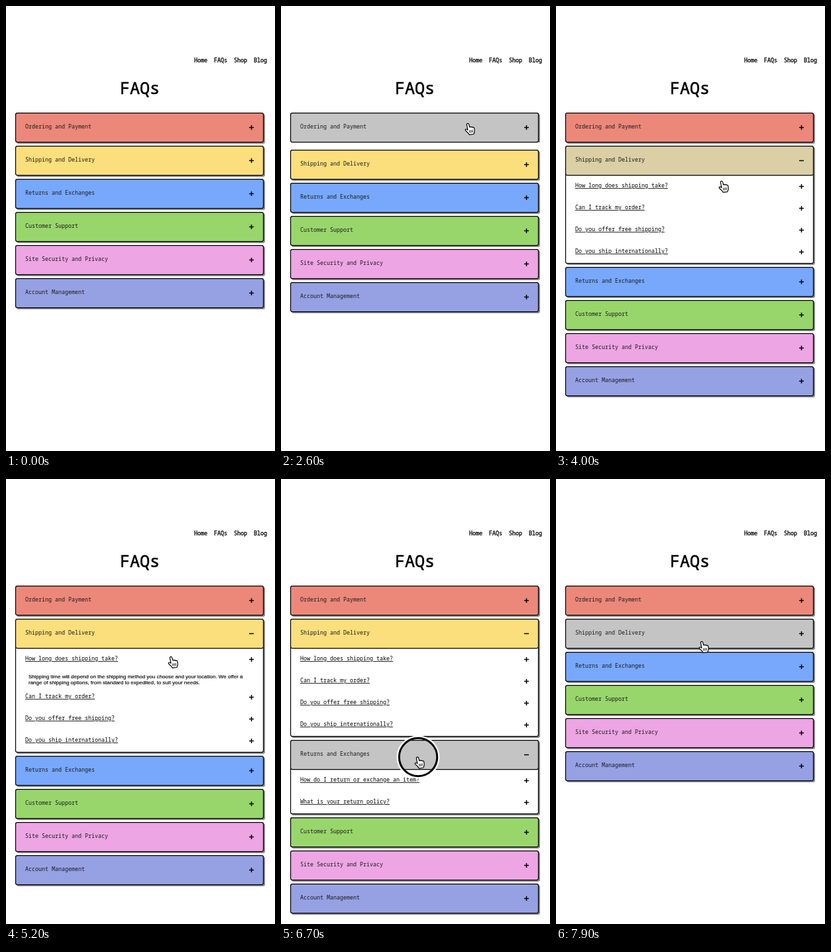
An HTML page for the animation above (8 s loop, 406 by 672 pixels).

```html
<!DOCTYPE html>
<html lang="en">
<head>
<meta charset="utf-8">
<title>FAQs</title>
<style>
  html, body { margin: 0; width: 100%; height: 100%; overflow: hidden; background: #fff; }
  svg { display: block; width: 406px; height: 672px; }
  text { font: 8.333px "Noto Sans Mono", "DejaVu Sans Mono", monospace; fill: #000; }
  .nav { stroke: #000; stroke-width: 0.3; }
  .title { font-size: 25px; stroke: #000; stroke-width: 0.6; }
  .label { fill: #1a1a1a; }
  .question { text-decoration: underline; }
  .answer { font: 8px "Liberation Sans", Arial, sans-serif; stroke: #000; stroke-width: 0.15; }
  .sign { fill: none; stroke: #000; stroke-width: 1.5; }
  .box { stroke: #000; stroke-width: 1.25; }
  .shadow { fill: #8c8c8c; }
</style>
</head>
<body>
<svg id="stage" viewBox="0 0 406 672"></svg>
<script>
const LOOP = 8000, ROW = 33, ANSWER_HEIGHT = 28;
const HOVER_GREY = [196, 196, 196];

// open and hover hold [start, end] times in ms
const sections = [
  { label: 'Ordering and Payment', color: [236, 136, 122], open: [[1307, 2455]], hover: [[620, 2780]],
    questions: ['How do I place an order?', 'What payment methods do you accept?',
      'How do I change or update my order?', 'Is my payment information secure?'] },
  { label: 'Shipping and Delivery', color: [251, 223, 124], open: [[3380, 7590]],
    hover: [[2880, 3900], [7250, 9000]],
    questions: ['How long does shipping take?', 'Can I track my order?',
      'Do you offer free shipping?', 'Do you ship internationally?'],
    answer: ['Shipping time will depend on the shipping method you choose and your location. We offer a',
      'range of shipping options, from standard to expedited, to suit your needs.'] },
  { label: 'Returns and Exchanges', color: [120, 168, 252], open: [[6150, 6760]], hover: [[5880, 7080]],
    questions: ['How do I return or exchange an item?', 'What is your return policy?'] },
  { label: 'Customer Support', color: [152, 214, 108] },
  { label: 'Site Security and Privacy', color: [237, 165, 228] },
  { label: 'Account Management', color: [150, 161, 228] }
];
const answerOpen = [[4385, 5176]];
const clicks = [...sections.flatMap(section => section.open || []), ...answerOpen].flat();

// Pointer tip: [time, x, y]
const pointer = [
  [100, 400, 418], [800, 282, 178], [2700, 282, 178], [3050, 255, 238], [3780, 255, 238],
  [3980, 250, 265], [4300, 249, 269], [5500, 249, 269], [6000, 206, 420.5],
  [6980, 206, 420.5], [7350, 220, 246], [8000, 220, 246]
];

// The CSS "ease" timing curve
function ease(x) {
  if (x <= 0) return 0;
  if (x >= 1) return 1;
  let low = 0, high = 1, u = 0.5;
  for (let i = 0; i < 20; i++) {
    u = (low + high) / 2;
    const at = 0.75 * u * (1 - u) + u ** 3;
    if (at < x) low = u; else high = u;
  }
  return 0.3 * u * (1 - u) ** 2 + 3 * u * u * (1 - u) + u ** 3;
}

const active = (spans, t) => spans.some(([a, b]) => t >= a && t < b);

function level(spans, t, duration) {
  return spans.reduce((sum, [a, b]) => sum + ease((t - a) / duration) - ease((t - b) / duration), 0);
}

function pointerAt(t) {
  const next = Math.max(1, pointer.findIndex(p => p[0] >= t));
  const [t0, x0, y0] = pointer[next - 1], [t1, x1, y1] = pointer[next];
  const k = Math.min(1, Math.max(0, (t - t0) / (t1 - t0)));
  const s = k * k * (3 - 2 * k);
  return [x0 + (x1 - x0) * s, y0 + (y1 - y0) * s];
}

const stage = document.getElementById('stage');

function add(parent, tag, attrs = {}, content) {
  const node = document.createElementNS('http://www.w3.org/2000/svg', tag);
  set(node, attrs);
  if (content) node.textContent = content;
  parent.appendChild(node);
  return node;
}

function set(node, attrs) {
  for (const name in attrs) node.setAttribute(name, attrs[name]);
}

const show = (node, visible) => node.setAttribute('visibility', visible ? 'visible' : 'hidden');
const moveTo = (node, x, y) => node.setAttribute('transform', `translate(${x} ${y})`);
const signPath = (y, minus) => `M367 ${y}h7` + (minus ? '' : `M370.5 ${y - 3.5}v7`);

function addClip(id, y) {
  const clip = add(stage, 'clipPath', { id });
  return add(clip, 'rect', { x: 14, y, width: 380, height: 0 });
}

['Home', 'FAQs', 'Shop', 'Blog'].forEach((name, i) =>
  add(stage, 'text', { class: 'nav', x: 284 + 30 * i, y: 85 }, name));
add(stage, 'text', { class: 'title', x: 172, y: 133 }, 'FAQs');

function buildSection(section, index) {
  const group = add(stage, 'g');
  const part = { section, group };
  add(group, 'rect', { class: 'shadow', x: 16, y: 2, width: 375, height: 45, rx: 3 });
  if (section.questions) {
    part.clip = addClip('body' + index, 45);
    part.blank = add(group, 'rect', { x: 13, y: 45, width: 379, fill: '#fff' });
    part.shadow = add(group, 'rect', { class: 'shadow', x: 16, y: 40, width: 375, rx: 3 });
    part.body = add(group, 'rect', { class: 'box', x: 14.5, y: 40.5, width: 374, rx: 2.5, fill: '#fff' });
    const content = add(group, 'g', { 'clip-path': `url(#body${index})` });
    part.rows = section.questions.map(question => {
      const row = add(content, 'g');
      add(row, 'text', { class: 'question', x: 29, y: 18 }, question);
      row.sign = add(row, 'path', { class: 'sign', d: signPath(16.5) });
      return row;
    });
    if (section.answer) {
      part.answerClip = addClip('answer' + index, 45 + ROW);
      const answer = add(content, 'g', { 'clip-path': `url(#answer${index})` });
      section.answer.forEach((line, i) =>
        add(answer, 'text', { class: 'answer', x: 34, y: 90 + 9 * i }, line));
    }
  }
  part.header = add(group, 'rect', { class: 'box', x: 14.5, y: 0.5, width: 374, height: 44, rx: 2.5 });
  add(group, 'text', { class: 'label', x: 29, y: 24 }, section.label);
  part.sign = add(group, 'path', { class: 'sign' });
  return part;
}

const parts = sections.map(buildSection);

const ring = add(stage, 'g');
add(ring, 'circle', { r: 30, fill: 'none', stroke: '#fff', 'stroke-width': 5 });
add(ring, 'circle', { r: 28.7, fill: 'none', stroke: '#000', 'stroke-width': 3 });

const hand = add(stage, 'g');
add(hand, 'path', {
  d: 'M-1.7 .8Q-1.5-.7 0-.6Q1.2-.5 1.6.9L2.8 5Q4 3.8 5.2 5Q6.5 4.1 7.4 5.4Q9.2 4.8 9.7 6.6' +
     'L10.2 10Q10.3 12.4 8.8 15.5L2.2 16.3Q.6 13.2-2.6 10.9Q-4.5 9.2-3.3 8.2Q-2.1 7.5-.1 9.2Z',
  fill: '#fff', stroke: '#000', 'stroke-width': 1.2, 'stroke-linejoin': 'round'
});
add(hand, 'path', { d: 'M2.6 9.5l.4 4M4.8 9.3l.3 4M7 9l.2 4', stroke: '#000', 'stroke-width': 0.9 });

function drawSection(part, t, top) {
  const { section } = part;
  const grey = level(section.hover || [], t, 400);
  const fill = section.color.map((c, i) => Math.round(c + (HOVER_GREY[i] - c) * grey));
  const isOpen = active(section.open || [], t);
  moveTo(part.group, 0, top);
  set(part.header, { fill: `rgb(${fill})` });
  set(part.sign, { d: signPath(22.5, isOpen) });
  if (!section.questions) return 0;

  const extra = section.answer ? Math.round(ANSWER_HEIGHT * level(answerOpen, t, 200)) : 0;
  const full = section.questions.length * ROW + 1 + extra;
  const height = Math.round(full * level(section.open, t, 200));
  set(part.clip, { height });
  set(part.blank, { height });
  set(part.shadow, { height: height + 7 });
  set(part.body, { height: height + 4 });
  show(part.shadow, isOpen);
  show(part.body, isOpen);
  part.rows.forEach((row, i) => moveTo(row, 0, 45 + ROW * i + (i ? extra : 0)));
  if (section.answer) {
    set(part.answerClip, { height: extra });
    set(part.rows[0].sign, { d: signPath(16.5, active(answerOpen, t)) });
  }
  return height;
}

function draw(t) {
  let top = 161;
  for (const part of parts) top += 50 + drawSection(part, t, top);
  const [x, y] = pointerAt(t);
  moveTo(hand, x, y);
  moveTo(ring, x + 1, y - 0.5);
  show(hand, t >= 100);
  show(ring, clicks.some(click => t >= click - 250 && t < click));
}

function frame(now) {
  draw(now % LOOP);
  requestAnimationFrame(frame);
}
draw(0);
requestAnimationFrame(frame);
</script>
</body>
</html>
```
